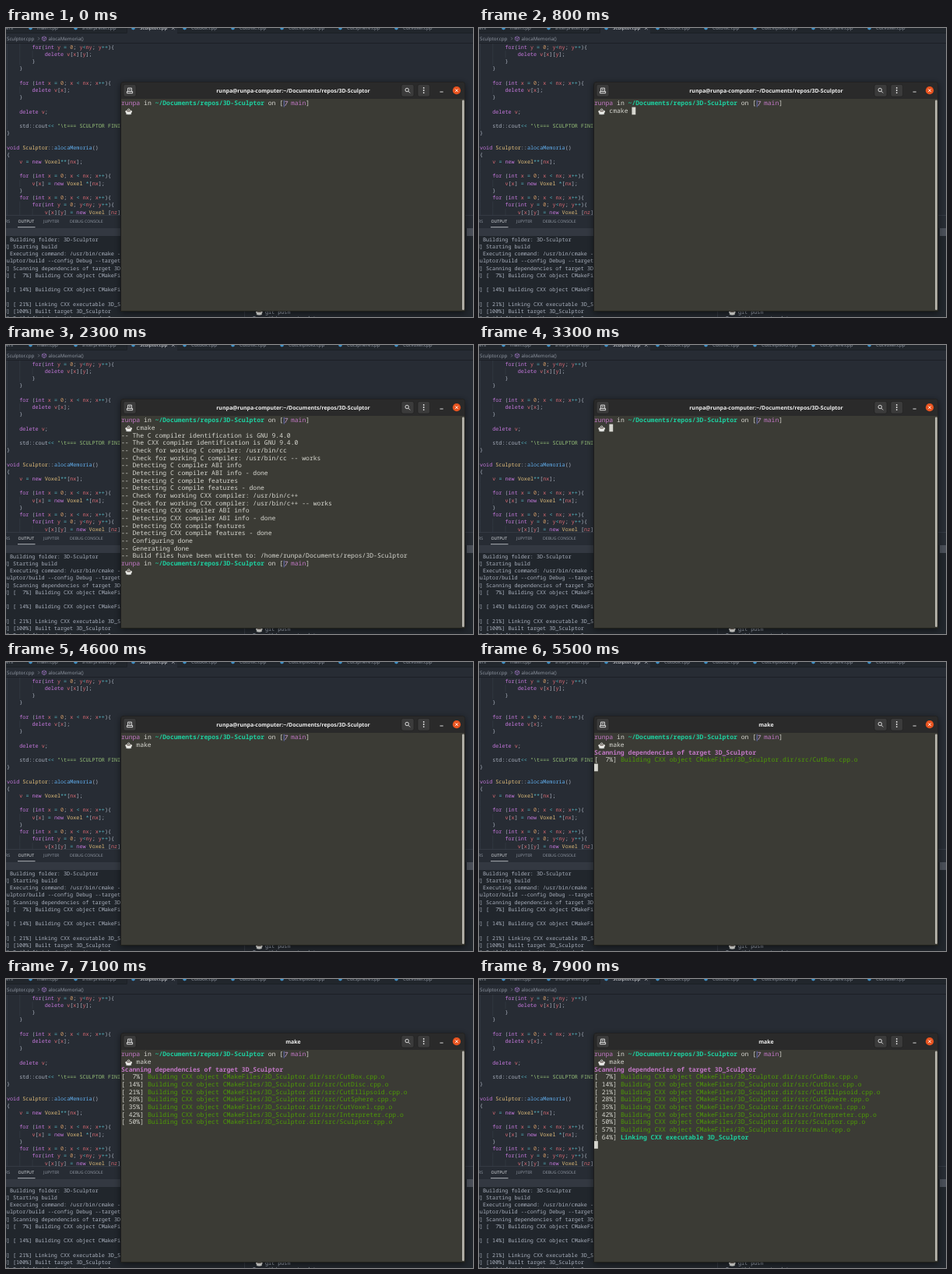
These frames come from a looping animation (600 by 371 pixels, 8 s). An HTML page:

```html
<!DOCTYPE html>
<html lang="en">
<head>
<meta charset="utf-8">
<title>Terminal build</title>
<style>
html, body { margin: 0; width: 100%; height: 100%; overflow: hidden; background: #272c34; }
svg { display: block; width: 600px; height: 371px; }
text { white-space: pre; text-rendering: geometricPrecision; }
.code { font: 6.78px "Noto Sans Mono", monospace; fill: #abb2bf; }
.term { font: 8.07px "Noto Sans Mono", monospace; fill: #d6d6cf; }
.ui { font: 6.2px "Noto Sans", sans-serif; fill: #8d949f; }
.panel { font-size: 5.2px; }
.title { font: bold 6.94px "Noto Sans", sans-serif; fill: #f2f2f2; text-anchor: middle; }
.lit { fill: #e3e6ea; }
.key { fill: #c678dd; }
.type { fill: #e5c07b; }
.func { fill: #61afef; }
.num { fill: #d19a66; }
.var { fill: #e06c75; }
.op { fill: #56b6c2; }
.str { fill: #98c379; }
.user { fill: #c177c4; }
.head { fill: #c177c4; font-weight: bold; }
.path { fill: #1dd0a0; font-weight: bold; }
.obj { fill: #4e9a06; }
</style>
</head>
<body>
<svg viewBox="0 0 600 371">
  <defs>
    <filter id="shadow" x="-10%" y="-10%" width="120%" height="125%">
      <feDropShadow dx="0" dy="2" stdDeviation="4" flood-color="#000" flood-opacity=".5"/>
    </filter>
    <g id="cup">
      <path d="M3.6 2.6q-.4-1.2 1-1.6q1.4 0 1.2 1.6" fill="none" stroke="#c9cac6" stroke-width=".9"/>
      <ellipse cx="4.8" cy="7.6" rx="3.6" ry="1.1" fill="#b9bdbb"/>
      <path d="M.6 4.4h8.4q-.3 3.4-4.2 3.4T.6 4.4z" fill="#ecece8"/>
      <ellipse cx="4.8" cy="4.3" rx="4.2" ry="1.6" fill="#ecece8"/>
      <ellipse cx="4.8" cy="4.2" rx="3" ry=".8" fill="#6d625c"/>
    </g>
  </defs>

  <g id="editor">
    <rect width="600" height="371" fill="#272c34"/>
    <rect width="600" height="7" fill="#21262c"/>
    <path d="M0 6.5H600M0 19.5H600" stroke="#1b1f25" stroke-width=".9"/>
    <rect x="155" width="65" height="7" fill="#272c34"/>
    <path d="M155.5 0V6.5" stroke="#1b1f25" stroke-width=".8"/>
    <rect y="257" width="600" height="114" fill="#21262c"/>
    <path d="M0 240.5H600M306.5 257V371" stroke="#3a3f4a" stroke-width=".7"/>
    <rect y="257" width="306" height="10" fill="#333841"/>
    <rect x="592" y="257" width="8" height="10" fill="#4a4f58"/>
    <path d="M15 255.7H37.5" stroke="#d7dae0" stroke-width=".8"/>
    <path d="M213-1.6l3.6 3.6m0-3.6l-3.6 3.6" stroke="#c8ccd4" stroke-width=".7"/>
    <path d="M41.2 11.8l1.7 1.8-1.7 1.8" fill="none" stroke="#8d949f" stroke-width=".6"/>
    <path d="M49 10.8l2.6 1.3v3L49 16.5l-2.6-1.4v-3zm-2.6 1.3L49 13.5l2.6-1.4M49 13.5v3" fill="none" stroke="#b180d7" stroke-width=".6"/>
  </g>

  <g filter="url(#shadow)">
    <path d="M147 363.8V73q0-4 4-4H586q4 0 4 4V363.8z" fill="#1f1f1e"/>
    <path d="M148 91V73q0-3.3 3.3-3.3H586q3.3 0 3.3 3.3V91z" fill="#2a2a2a"/>
    <rect x="148" y="91" width="441.3" height="272" fill="#3a3a36"/>
  </g>
  <rect x="586" y="92.5" width="2.8" height="269.5" rx="1.2" fill="#b4b2aa"/>
  <g transform="translate(0 .5)">
    <g fill="#3b3b3b" stroke="#1d1d1d" stroke-width=".5">
      <rect x="151" y="72" width="16" height="15.5" rx="2.2"/>
      <rect x="508" y="72" width="16" height="15.5" rx="2.2"/>
      <rect x="529" y="72" width="15.5" height="15.5" rx="2.2"/>
    </g>
    <g fill="none" stroke="#eee" stroke-width=".9">
      <path d="M156.6 80.6v-4h4.8v4M155.4 81h7.2v2.2h-7.2zM159 77.5v2.4"/>
      <circle cx="515.2" cy="79" r="2.2"/>
      <path d="M516.9 80.7l2.2 2.2M557.5 81.5h4.2"/>
    </g>
    <g fill="#eee">
      <circle cx="536.7" cy="76.4" r=".9"/><circle cx="536.7" cy="79.5" r=".9"/><circle cx="536.7" cy="82.6" r=".9"/>
    </g>
    <circle cx="579" cy="79.7" r="5.1" fill="#e95420"/>
    <path d="M577.2 77.9l3.6 3.6m0-3.6l-3.6 3.6" stroke="#fff" stroke-width=".9"/>
    <text class="title" id="title" x="369" y="82"></text>
  </g>
  <g id="screen"></g>
</svg>

<script>
const LOOP = 8000;
const USER = 'runpa';
const REPO = 'Documents/repos/3D-Sculptor';
const HOME_TITLE = `${USER}@${USER}-computer:~/${REPO}`;
const $ = id => document.getElementById(id);
const esc = s => s.replace(/&/g, '&amp;').replace(/</g, '&lt;');
const span = (cls, s) => `<tspan class="${cls}">${esc(s)}</tspan>`;
const text = (cls, x, y, inner) => `<text class="${cls}" x="${x}" y="${y.toFixed(2)}">${inner}</text>`;

// ---- static editor behind the terminal ----
const CODE = `        for(int y = 0; y<ny; y++){
            delete v[x][y];
        }
    }

    for (int x = 0; x < nx; x++){
        delete v[x];
    }

    delete v;

    std::cout<< "\\t=== SCULPTOR FINISHED
}

void Sculptor::alocaMemoria()
{
    v = new Voxel**[nx];

    for (int x = 0; x < nx; x++){
        v[x] = new Voxel *[nx];
    }
    for (int x = 0; x < nx; x++){
        for(int y = 0; y<ny; y++){
            v[x][y] = new Voxel [nz];`.split('\n');
const CODE_COL = 4.068, CODE_ROW = 9.21;

const LOG = [
  '  Building folder: 3D-Sculptor',
  'd] Starting build',
  '  Executing command: /usr/bin/cmake --build',
  'culptor/build --config Debug --target all',
  'd] Scanning dependencies of target 3D_Sculptor',
  'd] [  7%] Building CXX object CMakeFiles',
  '',
  'd] [ 14%] Building CXX object CMakeFiles',
  '',
  'd] [ 21%] Linking CXX executable 3D_Sculptor',
  'd] [100%] Built target 3D_Sculptor',
  'd] Build finished with exit code 0'
];

const TABS = [[40, 'main.cpp'], [98, 'Interpreter.cpp'], [172, 'Sculptor.cpp'], [238, 'CutBox.cpp'],
  [300, 'CutDisc.cpp'], [363, 'CutEllipsoid.cpp'], [438, 'CutSphere.cpp'], [510, 'CutVoxel.cpp']];

const TOKENS = /(?<str>"[^"]*)|(?<key>\b(?:for|int|delete|new|void)\b)|(?<type>\b(?:Voxel|Sculptor)\b)|(?<func>\balocaMemoria\b)|(?<num>\b\d+\b)|(?<var>\b[vxyn][xyz]?\b)|(?<op>[-+*=<]+)/g;

function highlight(line) {
  return line.replace(TOKENS, (match, ...rest) => {
    const groups = rest[rest.length - 1];
    return span(Object.keys(groups).find(k => groups[k] !== undefined), match);
  });
}

// Indent guides; blank lines keep the depth of the line above.
function guides() {
  let depth = 0, d = '';
  CODE.forEach((line, i) => {
    if (line) depth = line.search(/\S/);
    for (let c = 0; c < depth; c += 4)
      d += `M${1.5 + c * CODE_COL} ${19.9 + i * CODE_ROW}v${CODE_ROW}`;
  });
  return `<path d="${d}" stroke="#3a404a" stroke-width=".6"/>`;
}

function drawEditor() {
  let out = guides() + text('ui', 0, 2.3, 'ers');
  for (const [x, name] of TABS) {
    out += `<circle cx="${x - 8.5}" cy="0" r="2.4" fill="#3f8fc4"/>`;
    out += text(name === 'Sculptor.cpp' ? 'ui lit' : 'ui', x, 2.3, name);
  }
  out += text('ui', 1, 15.8, 'Sculptor.cpp') + text('ui', 54.5, 15.8, 'alocaMemoria()');
  CODE.forEach((line, i) => out += text('code', 1, 26.7 + i * CODE_ROW, highlight(line)));
  [[-1, 'RS'], [15.5, 'OUTPUT'], [48, 'JUPYTER'], [82, 'DEBUG CONSOLE']].forEach(([x, s]) =>
    out += text(s === 'OUTPUT' ? 'ui panel lit' : 'ui panel', x, 250.4, s));
  LOG.forEach((line, i) => out += text('code', -3.2, 273.9 + i * 9.18, esc(line)));
  out += '<use href="#cup" x="320.5" y="360"/>';
  out += text('code', 333, 367.2, 'git push') + text('code', 317, 375.4, 'Everything up-to-date');
  $('editor').insertAdjacentHTML('beforeend', out);
}

// ---- terminal ----
const COL = 4.842, ROW = 9.68, LEFT = 148, TOP = 91.9;
const rowText = (row, inner, col = 0) => text('term', LEFT + col * COL, TOP + row * ROW + 7.3, inner);

const checks = (lang, bin) => [
  `Check for working ${lang} compiler: ${bin}`,
  `Check for working ${lang} compiler: ${bin} -- works`,
  `Detecting ${lang} compiler ABI info`,
  `Detecting ${lang} compiler ABI info - done`,
  `Detecting ${lang} compile features`,
  `Detecting ${lang} compile features - done`
];
const CMAKE = [
  'The C compiler identification is GNU 9.4.0',
  'The CXX compiler identification is GNU 9.4.0',
  ...checks('C', '/usr/bin/cc'),
  ...checks('CXX', '/usr/bin/c++'),
  'Configuring done',
  'Generating done',
  `Build files have been written to: /home/${USER}/${REPO}`
].map((s, i) => [[1300, 1600, 1700][i] || (i > 13 ? 2200 : 1700 + Math.ceil((i - 2) / 3) * 100), esc('-- ' + s)]);

const percent = n => `[${String(n).padStart(3)}%] `;
const MAKE = [[5200, span('head', 'Scanning dependencies of target 3D_Sculptor')]];
[[5300, 7, 'CutBox'], [5800, 14, 'CutDisc'], [6000, 21, 'CutEllipsoid'], [6200, 28, 'CutSphere'],
 [6400, 35, 'CutVoxel'], [6800, 42, 'Interpreter'], [7100, 50, 'Sculptor'], [7500, 57, 'main']]
  .forEach(([at, n, name]) => MAKE.push([at, percent(n) +
    span('obj', `Building CXX object CMakeFiles/3D_Sculptor.dir/src/${name}.cpp.o`)]));
MAKE.push([7800, percent(64) + span('path', 'Linking CXX executable 3D_Sculptor')]);

// typed: first key, enter: return pressed, done: prompt comes back
const RUNS = [
  { from: 0, cmd: 'cmake .', typed: 300, enter: 1200, done: 2200, lines: CMAKE, blink: -600 },
  { from: 3000, cmd: 'make', typed: 3700, enter: 5100, done: Infinity, lines: MAKE, blink: 3000 }
];
const KEY_GAP = 100;

function prompt(row, cmd) {
  const y = TOP + row * ROW;
  return rowText(row, span('user', USER) + ' in ' + span('path', '~/' + REPO) + ' on [') +
    `<path d="M357.2 ${y + .8}v8.8" stroke="#6d78d6" stroke-width=".8"/>` +
    `<path d="M358.4 ${y + 2.4}h3.5l-3.3 5.6" fill="none" stroke="#c9a0d0" stroke-width=".8"/>` +
    rowText(row, span('user', 'main') + ']', 45) +
    `<use href="#cup" x="${LEFT + COL}" y="${y + ROW + 1}"/>` +
    rowText(row + 1, cmd, 4);
}

function view(t) {
  const run = RUNS[t < RUNS[1].from ? 0 : 1];
  const keys = Math.max(0, Math.min(run.cmd.length, Math.floor((t - run.typed) / KEY_GAP) + 1));
  const lines = run.lines.filter(([at]) => at <= t);
  const entered = t >= run.enter, done = t >= run.done;
  const lastKey = entered ? run.enter : keys ? run.typed + (keys - 1) * KEY_GAP : run.blink;
  const row = entered ? 2 + lines.length + (done ? 1 : 0) : 1;
  const col = done ? 4 : entered ? 0 : 4 + keys;

  let html = prompt(0, run.cmd.slice(0, keys));
  lines.forEach(([, inner], i) => html += rowText(i + 2, inner));
  if (done) html += prompt(row - 1, '');
  if ((t - lastKey) % 1200 < 600)
    html += `<rect x="${LEFT + col * COL}" y="${TOP + row * ROW}" width="${COL}" height="${ROW}" fill="#d6d6cf"/>`;
  return { html, title: entered && !done ? run.cmd : HOME_TITLE };
}

let shown = '';
const start = performance.now();
function frame() {
  const { html, title } = view((performance.now() - start) % LOOP);
  if (html + title !== shown) {
    shown = html + title;
    $('screen').innerHTML = html;
    $('title').textContent = title;
  }
  requestAnimationFrame(frame);
}

drawEditor();
frame();
</script>
</body>
</html>
```
